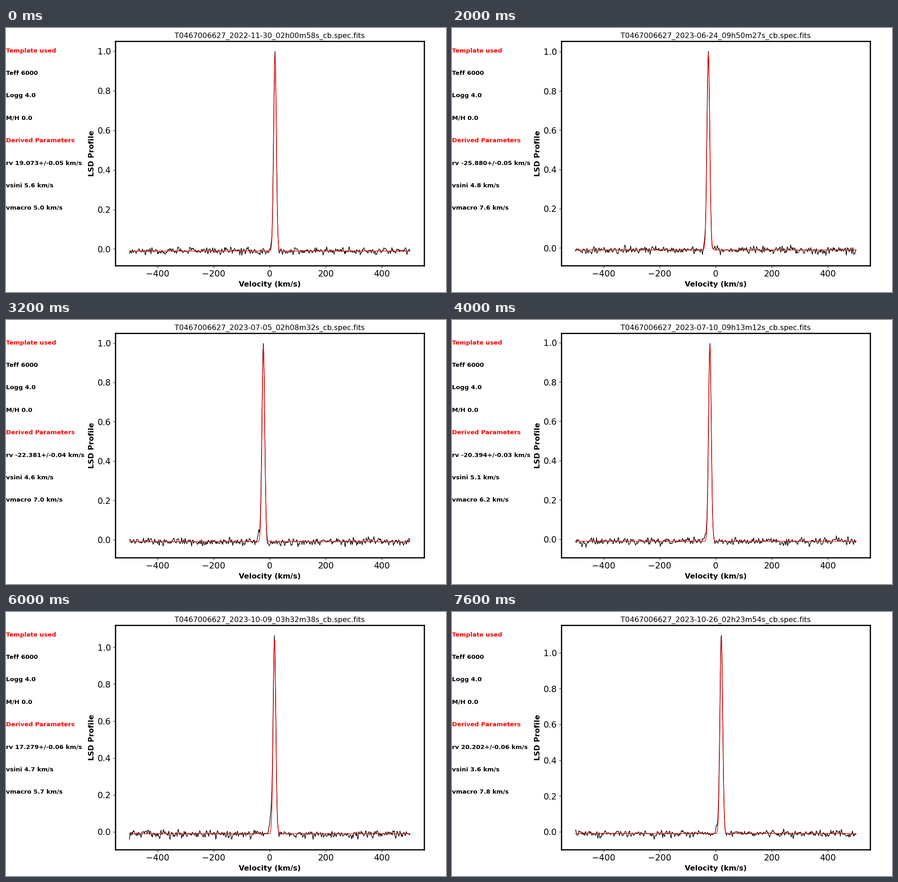
These frames come from a looping animation (966x580 px, 8 s). A matplotlib script:

```python
import numpy as np
import matplotlib.pyplot as plt
from matplotlib.animation import FuncAnimation

W, H, DPI = 966, 580, 64
LEFT, RIGHT, TOP, BOTTOM = 240.1, 917.7, 29.0, 522.0
COUNT = 20
BASE = -0.0105          # continuum level of the profile

plt.rcParams["font.family"] = "DejaVu Sans"

# Key observations; everything between them is interpolated:
# index, time, rv, rv error, vsini, vmacro, highest, lowest, wing (+ blue, - red)
KEYS = [
    (0, "2022-11-30T02:00:58", 19.073, 0.05, 5.6, 5.0, 0.999, -0.0325, 0.02),
    (1, "2022-12-07T01:42:36", 17.846, 0.05, 5.2, 5.8, 1.012, -0.0360, 0.02),
    (2, "2023-06-12T08:41:50", -29.637, 0.04, 5.4, 7.8, 1.004, -0.0374, -0.05),
    (7, "2023-07-02T10:36:12", -23.375, 0.05, 4.4, 7.4, 0.999, -0.0384, 0.06),
    (10, "2023-07-10T09:13:12", -20.394, 0.03, 5.1, 6.2, 0.996, -0.0414, 0.035),
    (13, "2023-07-26T07:07:17", -13.644, 0.03, 5.5, 4.4, 1.049, -0.0328, 0.01),
    (15, "2023-10-09T03:32:38", 17.279, 0.06, 4.7, 5.7, 1.064, -0.0410, 0.09),
    (19, "2023-10-26T02:23:54", 20.202, 0.06, 3.6, 7.8, 1.098, -0.0433, 0.03),
]
index, times, *columns = zip(*KEYS)
seconds = np.array(times, dtype="datetime64[s]").astype(np.int64)

vel = np.linspace(-500, 500, 560)
fine = np.linspace(-500, 500, 2000)


def pt(size):
    """Point size of the 96.6 dpi layout on this figure."""
    return size * 96.6 / DPI


def bell(v, centre, width):
    return np.exp(-0.5 * ((v - centre) / width) ** 2)


def stamp(i):
    moment = np.datetime64(round(np.interp(i, index, seconds)), "s")
    date, clock = str(moment).split("T")
    hour, minute, second = clock.split(":")
    return f"{date}_{hour}h{minute}m{second}s"


def observed(i, rv, width, hi, lo, wing):
    """Noisy profile that spans exactly lo to hi."""
    rng = np.random.default_rng(40 + i)
    noise = np.convolve(rng.normal(size=vel.size + 2), [0.18, 0.64, 0.18], "valid")
    core = bell(vel, rv - 0.3, width)
    dev = 0.0085 * noise / noise.std() * (1 - core)
    dev = np.where(dev < 0, dev * (lo - BASE) / dev.min(), dev)
    dev += abs(wing) * bell(vel, rv - 14 * np.sign(wing), 4.5)
    y = BASE + dev
    peak = core.argmax()
    return y + core * (hi - y[peak]) / core[peak]


def fitted(rv, width, hi, wing):
    top = hi - 0.01 - 0.15 * abs(wing)
    return BASE + (top - BASE) * bell(fine, rv, width)


fig = plt.figure(figsize=(W / DPI, H / DPI), dpi=DPI, facecolor="white")
ax = fig.add_axes([LEFT / W, 1 - BOTTOM / H, (RIGHT - LEFT) / W, (BOTTOM - TOP) / H])
ax.set_xlim(-550, 550)
ax.set_xticks(np.arange(-400, 401, 200))
ax.set_yticks(np.arange(6) * 0.2)
ax.tick_params(labelsize=pt(14), length=pt(3.5), width=pt(0.8), pad=pt(3.5))
for spine in ax.spines.values():
    spine.set_linewidth(pt(2))
label = dict(fontsize=pt(12), fontweight="bold", labelpad=pt(4))
ax.set_xlabel("Velocity (km/s)", **label)
ax.set_ylabel("LSD Profile", **label)
title = ax.set_title("", fontsize=pt(12), pad=pt(5.3))

data_line, = ax.plot([], [], color="black", lw=pt(1))
fit_line, = ax.plot([], [], color="red", lw=pt(1))


def side_text(row, text):
    y = 1 - (TOP + (0.05 + 0.1 * row) * (BOTTOM - TOP)) / H
    color = "red" if row in (0, 4) else "black"
    return fig.text(0, y, text, color=color, fontsize=pt(10), fontweight="bold")


lines = ["Template used", "Teff 6000", "Logg 4.0", "M/H 0.0", "Derived Parameters", "", "", ""]
rv_text, vsini_text, vmacro_text = [side_text(*row) for row in enumerate(lines)][5:]


def update(i):
    rv, err, vsini, vmacro, hi, lo, wing = [np.interp(i, index, c) for c in columns]
    width = 3.4 + 0.18 * np.hypot(vsini, vmacro)
    title.set_text(f"T0467006627_{stamp(i)}_cb.spec.fits")
    rv_text.set_text(f"rv {rv:.3f}+/-{err:.2f} km/s")
    vsini_text.set_text(f"vsini {vsini:.1f} km/s")
    vmacro_text.set_text(f"vmacro {vmacro:.1f} km/s")
    data_line.set_data(vel, observed(i, rv, width, hi, lo, wing))
    fit_line.set_data(fine, fitted(rv, width, hi, wing))
    margin = 0.05 * (hi - lo)
    ax.set_ylim(lo - margin, hi + margin)
    return data_line, fit_line


anim = FuncAnimation(fig, update, frames=COUNT, interval=400, repeat=True, blit=False)
plt.show()
```
